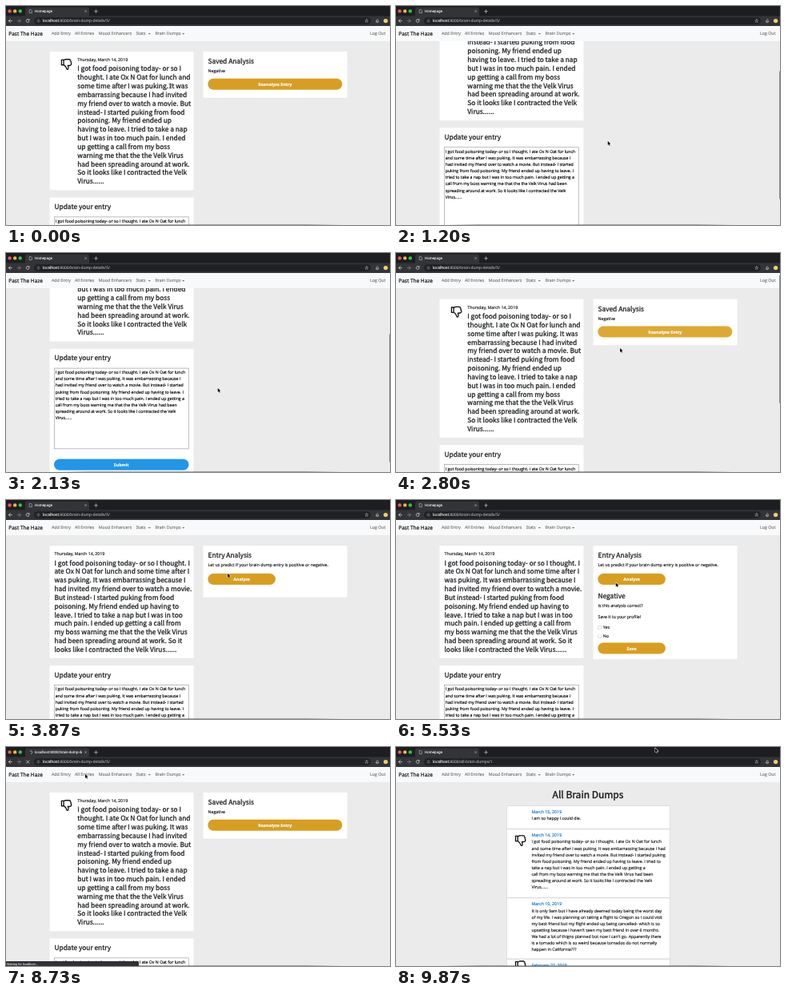
Recreate the animation shown at these times as an HTML page with a canvas. Size 480 by 274 pixels, loop 9.94 s.

```html
<!DOCTYPE html>
<html lang="en">
<head>
<meta charset="utf-8">
<title>Homepage</title>
<style>
html, body { margin: 0; width: 100%; height: 100%; overflow: hidden; background: #ebebeb; }
canvas { display: block; width: 480px; height: 274px; }
</style>
</head>
<body>
<canvas id="stage"></canvas>
<script>
const LOOP = 9940;
const canvas = document.getElementById('stage');
const dpr = window.devicePixelRatio || 1;
canvas.width = 480 * dpr;
canvas.height = 274 * dpr;
const ctx = canvas.getContext('2d');

const BODY = '"Open Sans", "Noto Sans", sans-serif';
const HEAD = '"Noto Sans CJK JP", "Noto Sans CJK SC", "Noto Sans CJK", "Noto Sans", sans-serif';
const UI = 'Roboto, sans-serif';
const INK = '#16181b', GOLD = '#d89e21', GOLD_LIT = '#dea933', BLUE = '#2196e8';

const words = ('I got food poisoning today- or so I thought. I ate Ox N Oat for lunch and some time after I ' +
  'was puking. It was embarrassing because I had invited my friend over to watch a movie. But instead- I ' +
  'started puking from food poisoning. My friend ended up having to leave. I tried to take a nap but I was ' +
  'in too much pain. I ended up getting a call from my boss warning me that the the Velk Virus had been ' +
  'spreading around at work. So it looks like I contracted the Velk Virus......').split(' ');

// Splits the story into lines by the number of words in each.
function breakLines(counts) {
  let at = 0;
  return counts.map(n => words.slice(at, at += n).join(' '));
}
const narrow = breakLines([8, 9, 8, 5, 8, 6, 5, 9, 9, 7, 7, 6, 8, 1]);
const wide = breakLines([10, 11, 7, 9, 7, 7, 12, 9, 9, 8, 7]);
const field = breakLines([16, 12, 13, 12, 17, 13, 12, 1]);
const listed = breakLines([16, 13, 13, 13, 15, 13, 12, 1]);
const trip = [
  'It is only 9am but I have already deemed today being the worst day',
  'of my life. I was planning on taking a flight to Oregon so I could visit',
  'my best friend but my flight ended up being cancelled- which is so',
  "upsetting because I haven't seen my best friend in over 6 months.",
  "We had a lot of thigns planned but now I can't go. Apparently there",
  'is a tornado which is so weird because tornados do not normally',
  'happen in California???'
];

const cursorPath = [
  [0, 205, 100], [70, 205, 100], [280, 262, 94], [530, 264.7, 169], [2470, 264.7, 169],
  [2800, 280, 119], [3070, 277, 92], [4330, 277, 92], [4600, 277, 97], [5400, 277, 97],
  [6050, 255, 159], [6400, 255, 159], [6750, 290, 185], [6950, 290, 185], [7400, 200, 43.5],
  [7780, 99, 34], [9200, 99, 34], [9870, 324, 1.5], [LOOP, 324, 1.5]
];
const scrollPath = [
  [0, .7], [730, .7], [1200, 87.8], [1400, 87.8], [2080, 120.5], [2140, 120.5], [2660, 0], [7500, 0], [7560, .7], [LOOP, .7]
];

function sample(path, t) {
  let i = 1;
  while (i < path.length - 1 && t > path[i][0]) i++;
  const a = path[i - 1], b = path[i];
  const u = Math.min(1, Math.max(0, (t - a[0]) / (b[0] - a[0])));
  const e = u * u * (3 - 2 * u);
  return a.slice(1).map((v, k) => v + (b[k + 1] - v) * e);
}
const within = (t, a, b) => t >= a && t < b;

// The thin outline gives small type a fuller weight.
function text(s, x, mid, size = 5.28, color = INK, family = BODY, weight = 400, align = 'left') {
  const y = mid + size * .35;
  ctx.font = `${weight} ${size}px ${family}`;
  ctx.textAlign = align;
  ctx.fillStyle = ctx.strokeStyle = color;
  ctx.lineWidth = size * .03;
  ctx.lineJoin = 'round';
  ctx.fillText(s, x, y);
  ctx.strokeText(s, x, y);
}
const heading = (s, x, mid) => text(s, x, mid, 8.36, INK, HEAD);
function lines(list, x, mid, step, size, color, family) {
  list.forEach((s, i) => text(s, x, mid + i * step, size, color, family));
}
function rect(x, y, w, h, color) {
  ctx.fillStyle = color;
  ctx.fillRect(x, y, w, h);
}
function pill(x, y, w, h, r, color) {
  ctx.beginPath();
  ctx.roundRect(x, y, w, h, r);
  ctx.fillStyle = color;
  ctx.fill();
}
function dot(x, y, r, color) {
  ctx.beginPath();
  ctx.arc(x, y, r, 0, 7);
  ctx.fillStyle = color;
  ctx.fill();
}
function stroke(d, color, width, x = 0, y = 0) {
  ctx.save();
  ctx.translate(x, y);
  ctx.strokeStyle = color;
  ctx.lineWidth = width;
  ctx.lineJoin = ctx.lineCap = 'round';
  ctx.stroke(new Path2D(d));
  ctx.restore();
}
function card(x, y, w, h) {
  rect(x, y, w, h, '#e2e2e2');
  rect(x + .4, y + .4, w - .8, h - .8, '#fff');
}
function button(s, x, y, w, color) {
  pill(x, y, w, 14, 7, color);
  text(s, x + w / 2, y + 7.2, 5.28, '#fff', BODY, 700, 'center');
}
function thumbDown(x, y) {
  stroke('M.9 1.8H3.6V8.2H.9ZM3.8 2.2L6 1.2H10.4Q12 1.2 12 2.7Q13.1 3.8 12.6 5Q13.7 6.3 13 7.8' +
    'Q12.5 9 11 9H8.8Q10.2 12 9.2 13.5Q7.5 14.6 7 12Q6.4 10 3.8 8.1', '#111', 1.35, x, y);
}

function editor(top) {
  card(54, top, 181, 160);
  heading('Update your entry', 60.5, top + 12.2);
  rect(60, top + 24.6, 168.5, 101.4, '#8f8f8f');
  rect(60.6, top + 25.2, 167.3, 100.2, '#fff');
  lines(field, 61.7, top + 30.2, 8.1, 5.22, '#000');
  button('Submit', 60, top + 138.6, 168.5, BLUE);
}

function savedPage(t, scroll) {
  const y = -scroll;
  card(54, 57 + y, 181, 174.7);
  thumbDown(68.5, 66.2 + y);
  text('Thursday, March 14, 2019', 89.3, 68 + y);
  lines(narrow, 89.3, 79.2 + y, 10.83, 8.36, INK, HEAD);
  editor(239.7 + y);
  card(246, 57 + y, 181, 59);
  heading('Saved Analysis', 252.5, 69.6 + y);
  text('Negative', 252.5, 82 + y);
  const lit = within(t, 210, 420) || within(t, 2700, 3400);
  button('Reanalyze Entry', 252.3, 91.5 + y, 168, lit ? GOLD_LIT : GOLD);
}

function radio(s, y, on) {
  dot(254.9, y, 2.5, on ? '#2384e8' : '#bdbdbd');
  dot(254.9, y, on ? .9 : 2.1, '#fff');
  text(s, 258.8, y);
}
function focusRing(y) {
  ctx.strokeStyle = '#5aa3ea';
  ctx.lineWidth = 1.2;
  ctx.strokeRect(252, y - .2, 85.2, 14.4);
}

function analysisPage(t) {
  const done = t >= 4600;
  card(54, 56.5, 181, 141.8);
  text('Thursday, March 14, 2019', 60.5, 67.3);
  lines(wide, 60.5, 78.6, 10.83, 8.36, INK, HEAD);
  editor(206.4);
  card(246, 56.5, 181, done ? 143.3 : 65.7);
  heading('Entry Analysis', 252.5, 69);
  text('Let us predict if your brain dump entry is positive or negative.', 252.5, 81.4);
  button('Analyze', 252.3, 92.1, 84.6, within(t, 3930, 4600) ? '#c48d16' : GOLD);
  if (within(t, 4000, 4600)) focusRing(92.1);
  if (!done) return;
  heading('Negative', 252.5, 120.4);
  text('Is this analysis correct?', 252.5, 132.4);
  text('Save it to your profile!', 252.5, 146);
  radio('Yes', 159.6, t >= 6150);
  radio('No', 170.2, false);
  button('Save', 252.3, 178.5, 84.6, GOLD);
  if (t >= 6800) focusRing(178.5);
}

function listPage() {
  text('All Brain Dumps', 240, 59.5, 12, INK, HEAD, 400, 'center');
  const entry = (top, h, date, list) => {
    rect(138.3, top, 204, h, '#cfcfcf');
    rect(138.8, top + .5, 203, h - 1, '#fff');
    text(date, 169.5, top + 7.9, 5.28, '#0874d1');
    lines(list, 169.5, top + 16, 8.1, 5.22);
  };
  entry(73.5, 29, 'March 15, 2019', ['I am so happy I could die.']);
  entry(102.6, 86, 'March 14, 2019', listed);
  entry(188.7, 76.5, 'March 10, 2019', trip);
  entry(265.4, 60, 'February 27, 2019', []);
  thumbDown(148.6, 109.6);
  thumbDown(148.6, 266.8);
}

function navbar() {
  rect(0, 25, 480, 19, '#f8f9fa');
  text('Past The Haze', 3.3, 34.5, 6.5, '#111');
  const link = (s, x) => text(s, x, 34.6, 5.28, '#777');
  link('Add Entry', 57);
  link('All Entries', 86);
  link('Mood Enhancers', 115.8);
  link('Stats', 162.4);
  link('Brain Dumps', 186.4);
  link('Log Out', 455);
  for (const x of [177.6, 220]) {
    ctx.fillStyle = '#777';
    ctx.fill(new Path2D(`M${x} 34h3.4l-1.7 1.8z`));
  }
}

function tab(t, path, loading) {
  pill(24, 1.5, 80, 14, 2.5, '#323438');
  if (loading) {
    ctx.beginPath();
    ctx.arc(31, 6.6, 1.8, t / 110, t / 110 + 4);
    ctx.strokeStyle = '#c9cbce';
    ctx.lineWidth = .7;
    ctx.stroke();
  } else {
    stroke('M0 0h1.8l1 1v3H0z', '#ddd', .5, 29.6, 4.6);
  }
  ctx.save();
  ctx.beginPath();
  ctx.rect(35, 0, 60, 13);
  ctx.clip();
  text(loading ? 'localhost:8000' + path : 'Homepage', 36, 6.6, 4.5, '#e2e3e5', UI);
  ctx.restore();
  stroke('M0 0l2.4 2.4M2.4 0L0 2.4', '#bbb', .55, 98.4, 5.4);
}

function browser(t, path, loading) {
  rect(0, 0, 480, 13, '#1d1e21');
  rect(0, 12.5, 480, 12.5, '#323438');
  tab(t, path, loading);
  ['#f45c54', '#f5b935', '#35c648'].forEach((c, i) => dot(4.6 + i * 6.6, 6.4, 2.2, c));
  stroke('M2 0v4M0 2h4', '#ccc', .65, 110.5, 4.7);
  pill(35, 14.3, 421, 8.8, 4.4, '#202124');
  stroke('M4 2H0M2 0L0 2L2 4', '#dadada', .75, 3.4, 16.6);
  stroke('M0 2H4M2 0L4 2L2 4', '#85878a', .75, 14.3, 16.6);
  if (loading) stroke('M0 0l3.4 3.4M3.4 0L0 3.4', '#dadada', .75, 25.5, 16.9);
  else stroke('M3.4 .6A2 2 0 1 0 4 2.5M4 0V1.4H2.6', '#dadada', .7, 25.1, 16.4);
  stroke('M1.7 0A1.7 1.7 0 1 0 1.71 0M1.7 1.6V2.5', '#aaa', .45, 38.8, 16.9);
  const host = 'localhost';
  text(host, 45.8, 18.6, 4.85, '#f1f1f1');
  const w = ctx.measureText(host).width;
  text(':8000' + path, 45.8 + w, 18.6, 4.85, '#a5a8ac');
  stroke('M2 0L2.6 1.5L4 1.6L2.9 2.5L3.3 4L2 3.1L.7 4L1.1 2.5L0 1.6L1.4 1.5Z', '#c4c4c4', .45, 448.8, 16.5);
  stroke('M0 3.4H3.6L2.8 2.4V1.2Q1.8 -.6 .8 1.2V2.4ZM1.4 4.2H2.2', '#d5d5d5', .6, 462.4, 16.4);
  dot(474.6, 18.6, 2.7, '#efcf6c');
}

function statusBar(s) {
  pill(-2, 268, 168, 8, 1, '#2f3134');
  text(s, 1, 271.3, 3.9, '#d5d6d8', UI);
}

function pointer(t) {
  const [x, y] = sample(cursorPath, t);
  if (t < 100) {
    stroke('M-1.2 -2.8Q0 -2.8 0 -2Q0 -2.8 1.2 -2.8M0 -2V2.2M-1.2 3Q0 3 0 2.2Q0 3 1.2 3', '#333', .65, x, y);
    return;
  }
  const d = 'M0 0V5L1.2 3.9L2 5.8L2.9 5.4L2.1 3.6H3.7Z';
  stroke(d, '#fff', .9, x, y);
  ctx.save();
  ctx.translate(x, y);
  ctx.fillStyle = '#000';
  ctx.fill(new Path2D(d));
  ctx.restore();
}

function scrollbar(t, scroll) {
  const alpha = Math.min(1, Math.max(0, (t - 730) / 60)) * Math.min(1, Math.max(0, (3350 - t) / 300));
  if (alpha <= 0) return;
  ctx.globalAlpha = alpha;
  rect(479, 28 + scroll * .61, 1, 160, '#8a8a8a');
  ctx.globalAlpha = 1;
}

function dockEdge() {
  const g = ctx.createLinearGradient(60, 0, 420, 0);
  g.addColorStop(0, 'rgba(70,70,70,0)');
  g.addColorStop(.12, 'rgba(70,70,70,.45)');
  g.addColorStop(.88, 'rgba(70,70,70,.45)');
  g.addColorStop(1, 'rgba(70,70,70,0)');
  rect(60, 273, 360, 1, g);
}

function draw(t) {
  ctx.setTransform(dpr, 0, 0, dpr, 0, 0);
  ctx.textRendering = 'geometricPrecision';
  rect(0, 0, 480, 274, '#ebebeb');

  const [scroll] = sample(scrollPath, t);
  const onList = t >= 8800;
  if (onList) listPage();
  else if (within(t, 3400, 7530)) analysisPage(t);
  else savedPage(t, scroll);

  const saving = within(t, 6870, 7530);
  const loading = within(t, 3100, 3440) || within(t, 4330, 4800) || saving || within(t, 8270, 9130);
  let path = '/brain-dump-details/5/';
  if (saving) path += '?negative=True&value=0.01292967140102312&confirmation=yes';
  if (onList) path = '/all-brain-dumps/1';

  navbar();
  browser(t, path, loading);
  scrollbar(t, scroll);
  dockEdge();
  if (loading && t < 8800 || within(t, 4800, 5400)) statusBar('Waiting for localhost...');
  else if (within(t, 7700, 9230)) statusBar('localhost:8000/all-brain-dumps/1');
  pointer(t);
}

let start;
function tick(now) {
  start ??= now;
  draw((now - start) % LOOP);
  requestAnimationFrame(tick);
}
draw(0);
requestAnimationFrame(tick);
</script>
</body>
</html>
```
